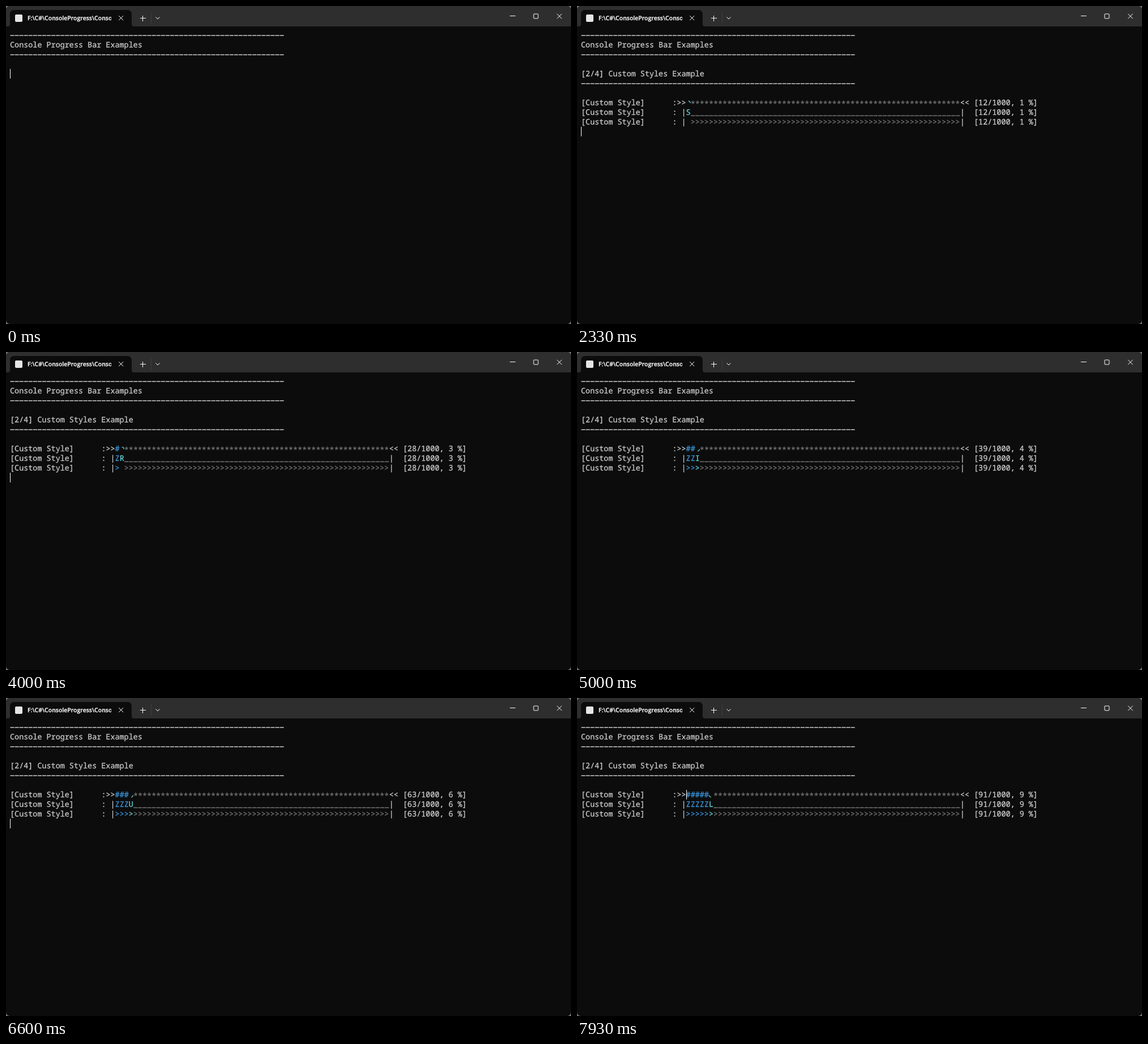
An HTML page that plays this animation: 998x561 px, repeating every 8000 ms.

```html
<!DOCTYPE html>
<html lang="en">
<head>
<meta charset="utf-8">
<title>Console progress bars</title>
<style>
  html, body { margin: 0; width: 100%; height: 100%; overflow: hidden; background: #777; }
  #win {
    --cw: 8.07px; --rh: 17px;
    position: absolute; left: 0; top: 0; width: 998px; height: 561px;
    overflow: hidden; border-radius: 7px; background: #0c0c0c;
  }
  #bar { position: absolute; inset: 0 0 auto; height: 36px; background: #2e2e2e; }
  #tab { position: absolute; left: 7px; top: 7px; width: 215px; height: 29px; background: #0c0c0c; border-radius: 7px 7px 0 0; }
  #icon { position: absolute; left: 9px; top: 8px; width: 13px; height: 13px; border-radius: 2px; background: #e6e6e6; }
  #name {
    position: absolute; left: 31px; top: 5px; width: 148px; overflow: hidden; white-space: pre;
    font: 600 10.5px/20px "Open Sans", sans-serif; color: #fff; text-rendering: geometricPrecision;
    -webkit-text-stroke: .25px;
  }
  svg { position: absolute; left: 0; top: 0; fill: none; }
  .t {
    position: absolute; white-space: pre; color: #ccc;
    left: calc(7px + var(--c) * var(--cw)); top: calc(43px + var(--r) * var(--rh));
    font: 500 13.45px/17px "Noto Sans Mono", "DejaVu Sans Mono", monospace;
    font-variant-ligatures: none; text-rendering: geometricPrecision;
    -webkit-text-stroke: .3px;
  }
  .dim { color: #767676; }
  .done { color: #3a96dd; }
  .now { color: #61d6d6; }
  .star { margin-top: 2px; }
  #cursor { width: 1px; height: 17px; background: #fff; }
  [hidden] { display: none; }
</style>
</head>
<body>
<div id="win">
  <div id="bar">
    <div id="tab"><div id="icon"></div><div id="name">F:\C#\ConsoleProgress\Console</div></div>
    <svg width="998" height="36" stroke="#fff">
      <path fill="#0c0c0c" stroke="none" d="M3 36Q7 36 7 32V36ZM226 36Q222 36 222 32V36Z"/>
      <path d="M199.2 17.2l8 8m0-8l-8 8M973.3 13.8l8.4 8.4m0-8.4l-8.4 8.4M264.5 19.5l3.5 3.5l3.5-3.5"/>
      <path d="M237 21.5h10M241.5 17v10M890 17.5h10"/>
      <rect x="932" y="14" width="8" height="8" rx="1"/>
      <path stroke="#3d3d3d" d="M256.5 11v20"/>
    </svg>
  </div>
  <div id="head"></div>
  <div id="demo" hidden></div>
  <svg width="998" height="561">
    <g stroke="#ccc" stroke-width="1.5" stroke-dasharray="7.1 .97">
      <path d="M7.5 52H491M7.5 86H491"/>
      <path class="demo" d="M7.5 137H491"/>
    </g>
    <path id="under" class="demo" stroke="#767676" stroke-width="1.3" stroke-dasharray="7.2 .87"/>
    <path id="arc" class="demo" stroke="#61d6d6" stroke-width="1.3" d="M-3.6 0A3.6 3.6 0 0 1 0-3.6"/>
  </svg>
  <div id="cursor" class="t"></div>
</div>
<script>
  const LOOP = 8000, TICK = 1000 / 15, START = 1000;
  const CELLS = 60, TOTAL = 1000, BAR = 23, CW = 8.07;
  const $ = id => document.getElementById(id);
  const begin = performance.now();

  // [ms, count] knots of the accelerating counter
  const pace = [[1000, 0], [2333, 12], [4000, 28], [5000, 39], [6000, 52], [7200, 73], [7933, 91]];

  function place(el, row, col) {
    el.style.setProperty('--r', row);
    el.style.setProperty('--c', col);
  }

  function put(parent, row, col, text, cls = '') {
    const el = document.createElement('div');
    el.className = 't ' + cls;
    el.textContent = text;
    place(el, row, col);
    parent.append(el);
    return el;
  }

  const demo = $('demo');
  put($('head'), 1, 0, 'Console Progress Bar Examples');
  put(demo, 4, 0, '[2/4] Custom Styles Example');

  const styles = [
    { open: ':>>', close: '<<', fill: '#', rest: '*', cls: 'star', active: () => '' },
    { open: ': |', close: '|', fill: 'Z', rest: '', active: f => String.fromCharCode(65 + Math.floor(f * 26)) },
    { open: ': |', close: '|', fill: '>', rest: '>', active: f => Math.floor(f * 4) % 2 ? '>' : '' }
  ];
  const lines = styles.map((s, i) => {
    const row = 7 + i;
    put(demo, row, 0, '[Custom Style]');
    put(demo, row, 20, s.open);
    put(demo, row, BAR + CELLS, s.close);
    return {
      ...s, row,
      done: put(demo, row, BAR, '', 'done'),
      now: put(demo, row, BAR, '', 'now'),
      left: put(demo, row, BAR, '', 'dim ' + (s.cls || '')),
      count: put(demo, row, 86, '')
    };
  });

  function countAt(ms) {
    for (let i = 1; i < pace.length; i++) {
      const [t0, v0] = pace[i - 1], [t1, v1] = pace[i];
      if (ms <= t1) return Math.round(v0 + (v1 - v0) * (ms - t0) / (t1 - t0));
    }
    return pace[pace.length - 1][1];
  }

  function drawBars(value) {
    const pos = value * CELLS / TOTAL, full = Math.floor(pos), frac = pos - full;
    for (const l of lines) {
      l.done.textContent = l.fill.repeat(full);
      l.now.textContent = l.active(frac);
      l.left.textContent = l.rest.repeat(CELLS - full - 1);
      place(l.now, l.row, BAR + full);
      place(l.left, l.row, BAR + full + 1);
      l.count.textContent = `[${value}/${TOTAL}, ${Math.round(value / 10)} %]`;
    }
    const x = 7 + (BAR + full) * CW;
    $('under').setAttribute('d', `M${x + CW + 0.4} 193.5H677`);
    $('arc').setAttribute('transform', `translate(${x + CW / 2} 171.3) rotate(${Math.floor(frac * 8) % 4 * 90})`);
  }

  function drawCursor(tick, ms, running) {
    const cursor = $('cursor');
    const inBar = running && tick % 88 === 31;
    const away = running ? tick % 22 === 9 && !inBar : ms >= 595;
    cursor.hidden = away;
    if (inBar) place(cursor, 7, BAR);
    else place(cursor, running ? 10 : 4, 0);
  }

  let last = -1;
  function frame() {
    // small lead keeps rounded frame times on the right tick
    const tick = Math.floor(((performance.now() - begin) % LOOP + 4) / TICK);
    if (tick !== last) {
      last = tick;
      const ms = tick * TICK, running = ms >= START - 1;
      demo.hidden = !running;
      document.querySelectorAll('.demo').forEach(el => el.style.display = running ? '' : 'none');
      if (running) drawBars(countAt(ms));
      drawCursor(tick, ms, running);
    }
    requestAnimationFrame(frame);
  }
  frame();
</script>
</body>
</html>
```
